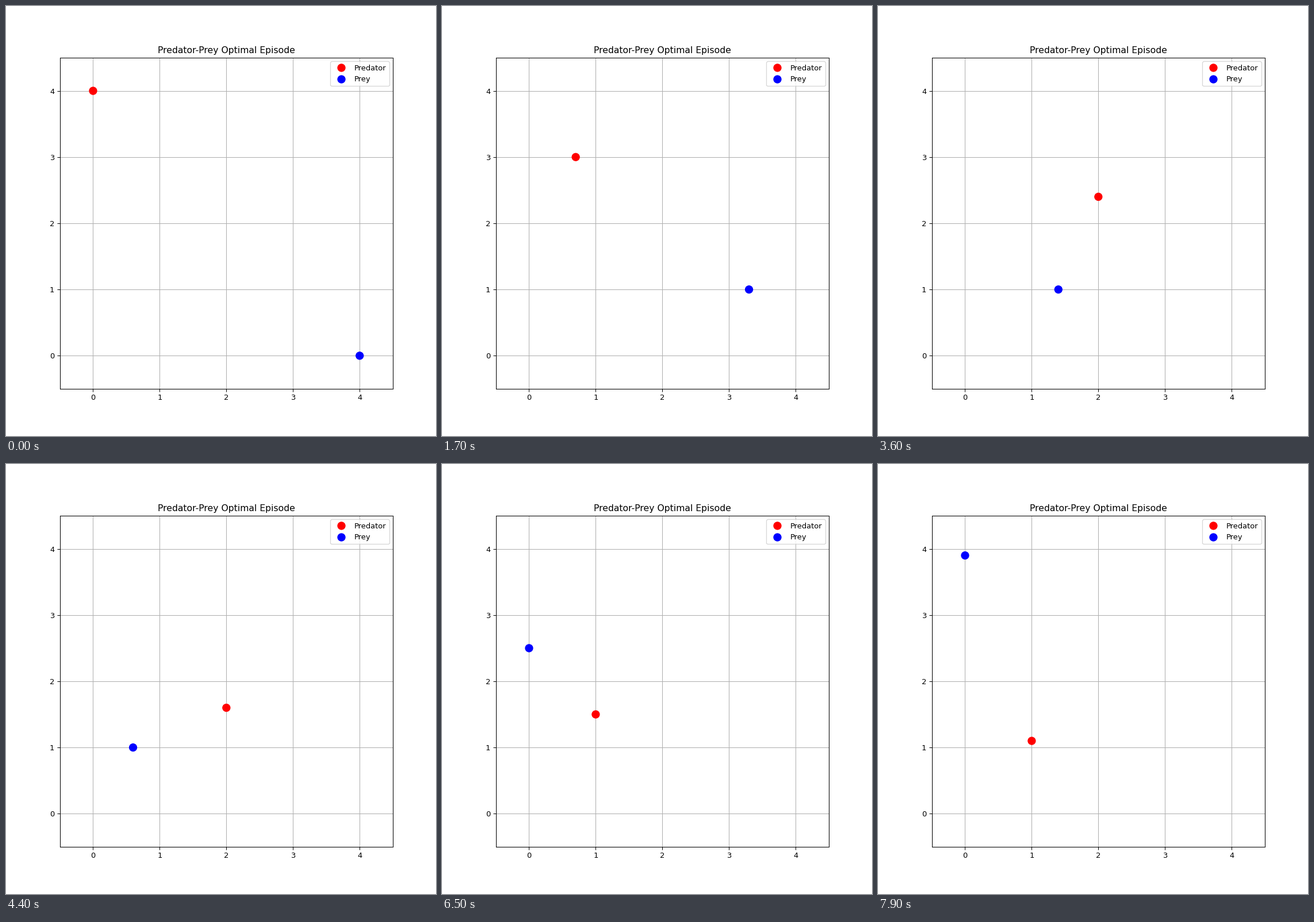
These frames come from a looping animation (748x748 px, 8000 ms). A matplotlib script:

```python
import matplotlib.pyplot as plt
import numpy as np
from matplotlib.animation import FuncAnimation
from matplotlib.patches import Ellipse

SIZE = 5        # cells per side of the grid
SUBSTEPS = 10   # frames per move from cell to cell
DOT = 10        # dot diameter in points, without its 1 pt edge
MOVES = {"U": (0, 1), "D": (0, -1), "L": (-1, 0), "R": (1, 0)}

fig, ax = plt.subplots(figsize=(8, 8), dpi=93.5)
fig.subplots_adjust(bottom=0.1097, top=0.8797)
ax.set(xlim=(-0.5, SIZE - 0.5), ylim=(-0.5, SIZE - 0.5),
       xticks=range(SIZE), yticks=range(SIZE),
       title="Predator-Prey Optimal Episode")
ax.grid(True)


class Agent:
    """A dot that walks from cell to cell at constant speed."""

    def __init__(self, label, color, start, moves):
        self.start = np.array(start)
        self.steps = np.array([MOVES[m] for m in moves])
        box = ax.get_position()
        inches = fig.get_size_inches() * (box.width, box.height)
        width, height = DOT / 72 * SIZE / inches
        self.dot = Ellipse(start, width, height, color=color, lw=1, zorder=2.5)
        ax.add_patch(self.dot)
        ax.plot([], [], "o", color=color, markersize=DOT, label=label)

    def move_to(self, frame):
        done, sub = divmod(frame, SUBSTEPS)
        self.dot.center = (self.start + self.steps[:done].sum(axis=0)
                           + self.steps[done] * sub / SUBSTEPS)


agents = [Agent("Predator", "red", (0, SIZE - 1), "DRRDDLUD"),
          Agent("Prey", "blue", (SIZE - 1, 0), "ULLLLUUU")]
ax.legend(loc="upper right")


def update(frame):
    for agent in agents:
        agent.move_to(frame)
    return [agent.dot for agent in agents]


anim = FuncAnimation(fig, update, frames=len(agents[0].steps) * SUBSTEPS,
                     interval=100, repeat=True, repeat_delay=0, blit=False)
plt.show()
```
